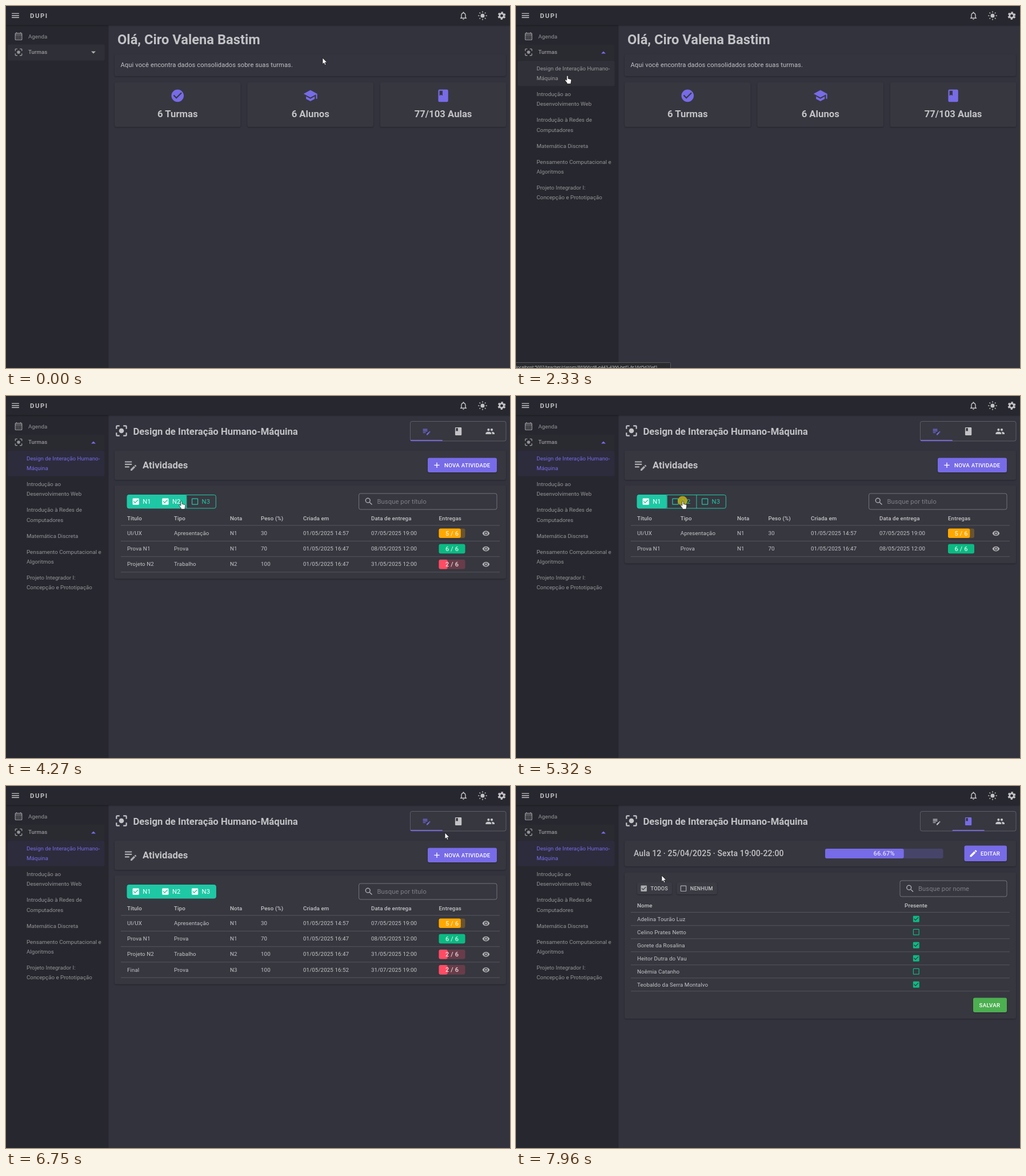
Recreate the animation shown at these times as an HTML page. Size 882x635 px, loop 8 s.

```html
<!DOCTYPE html>
<html lang="pt">
<head>
<meta charset="utf-8">
<title>Turmas</title>
<style>
  html, body { margin: 0; width: 100%; height: 100%; overflow: hidden; background: #32333d; }
  svg { display: block; width: 882px; height: 635px; font-family: Roboto, sans-serif; }
  .shadow { filter: drop-shadow(0 1px 1px rgba(0, 0, 0, .32)); }
  .status { font-family: "Open Sans", sans-serif; }
</style>
</head>
<body>
<svg id="stage" viewBox="0 0 882 635"></svg>
<script>
const LOOP = 8000;
const TEXT = 'rgba(255,255,255,.7)', NAV = 'rgba(255,255,255,.5)', LINE = 'rgba(255,255,255,.15)';
const SURFACE = '#373740', DARK = '#27272f', PURPLE = '#776be7', TEAL = '#1ec8a5', GREEN = '#0bba83';
const ORANGE = '#ffa800', RED = '#ff4c64', ICON = '#adadb1';
const SMALL = 9.75, BODY = 11.15, H6 = 14, H5 = 16.7, H4 = 23.7;

const ICONS = {
  menu: 'M3 18h18v-2H3zm0-5h18v-2H3zm0-7v2h18V6z',
  bell: 'M12 22c1.1 0 2-.9 2-2h-4c0 1.1.9 2 2 2zm6-6v-5c0-3.07-1.63-5.64-4.5-6.32V4a1.5 1.5 0 0 0-3 0v.68C7.64 5.36 6 7.92 6 11v5l-2 2v1h16v-1zm-2 1H8v-6c0-2.48 1.51-4.5 4-4.5s4 2.02 4 4.5z',
  calendar: 'M19 4h-1V2h-2v2H8V2H6v2H5a2 2 0 0 0-2 2v14a2 2 0 0 0 2 2h14a2 2 0 0 0 2-2V6a2 2 0 0 0-2-2zm0 16H5V10h14zm0-12H5V6h14zM9 14H7v-2h2zm4 0h-2v-2h2zm4 0h-2v-2h2zm-8 4H7v-2h2zm4 0h-2v-2h2zm4 0h-2v-2h2z',
  focus: 'M12 8a4 4 0 0 0 0 8 4 4 0 0 0 0-8zm-7 7H3v4a2 2 0 0 0 2 2h4v-2H5zM5 5h4V3H5a2 2 0 0 0-2 2v4h2zm14-2h-4v2h4v4h2V5a2 2 0 0 0-2-2zm0 16h-4v2h4a2 2 0 0 0 2-2v-4h-2z',
  done: 'M12 2a10 10 0 0 0 0 20 10 10 0 0 0 0-20zm-2 15l-5-5 1.41-1.41L10 14.17l7.59-7.59L19 8z',
  school: 'M5 13.18v4L12 21l7-3.82v-4L12 17zM12 3L1 9l11 6 9-4.91V17h2V9z',
  book: 'M18 2H6a2 2 0 0 0-2 2v16a2 2 0 0 0 2 2h12a2 2 0 0 0 2-2V4a2 2 0 0 0-2-2zM6 4h5v8l-2.5-1.5L6 12z',
  note: 'M3 10h11v2H3zm0-2h11V6H3zm0 8h7v-2H3zm15.01-3.13l.71-.71a1 1 0 0 1 1.41 0l.71.71a1 1 0 0 1 0 1.41l-.71.71zm-.71.71l-5.3 5.3V21h2.12l5.3-5.3z',
  group: 'M16 11a3 3 0 1 0-3-3 3 3 0 0 0 3 3zm-8 0a3 3 0 1 0-3-3 3 3 0 0 0 3 3zm0 2c-2.33 0-7 1.17-7 3.5V19h14v-2.5c0-2.33-4.67-3.5-7-3.5zm8 0c-.29 0-.62.02-.97.05 1.16.84 1.97 1.97 1.97 3.45V19h6v-2.5c0-2.33-4.67-3.5-7-3.5z',
  add: 'M19 13h-6v6h-2v-6H5v-2h6V5h2v6h6z',
  search: 'M15.5 14h-.79l-.28-.27A6.5 6.5 0 1 0 13.73 14.43l.27.28v.79l5 4.99L20.49 19zm-6 0a4.5 4.5 0 1 1 0-9 4.5 4.5 0 0 1 0 9z',
  eye: 'M12 4.5C7 4.5 2.73 7.61 1 12c1.73 4.39 6 7.5 11 7.5s9.27-3.11 11-7.5c-1.73-4.39-6-7.5-11-7.5zM12 17a5 5 0 1 1 0-10 5 5 0 0 1 0 10zm0-8a3 3 0 1 0 0 6 3 3 0 0 0 0-6z',
  checked: 'M19 3H5a2 2 0 0 0-2 2v14a2 2 0 0 0 2 2h14a2 2 0 0 0 2-2V5a2 2 0 0 0-2-2zm-9 14l-5-5 1.41-1.41L10 14.17l7.59-7.59L19 8z',
  blank: 'M19 5v14H5V5h14m0-2H5a2 2 0 0 0-2 2v14a2 2 0 0 0 2 2h14a2 2 0 0 0 2-2V5a2 2 0 0 0-2-2z',
  pencil: 'M3 17.25V21h3.75L17.81 9.94l-3.75-3.75zM20.71 7.04a1 1 0 0 0 0-1.41l-2.34-2.34a1 1 0 0 0-1.41 0l-1.83 1.83 3.75 3.75z',
  drop: 'M7 10l5 5 5-5z'
};

// Drawing helpers: each returns SVG markup.
const rect = (x, y, w, h, fill, attrs = 'rx="3"') =>
  `<rect x="${x}" y="${y}" width="${w}" height="${h}" fill="${fill}" ${attrs}/>`;
const paper = (x, y, w, h, fill = SURFACE) => rect(x, y, w, h, fill, 'rx="3" class="shadow"');
const outline = (x, y, w, h, color) => rect(x, y, w, h, 'none', `rx="3" stroke="${color}"`);
const hline = (y, x = 201, w = 663) => rect(x, y - .5, w, 1, LINE, '');
const text = (x, y, str, size = SMALL, { fill = TEXT, weight = 400, anchor = 'start', gap = .0107 } = {}) =>
  `<text x="${x}" y="${y}" font-size="${size}" fill="${fill}" font-weight="${weight}" text-anchor="${anchor}" letter-spacing="${(gap * size).toFixed(2)}">${str}</text>`;
const title = (x, y, str, size = H5, anchor = 'start') => text(x, y, str, size, { weight: 700, anchor, gap: 0 });
const icon = (name, cx, cy, size = 17, fill = ICON, attrs = '') =>
  `<path d="${ICONS[name]}" fill="${fill}" ${attrs} transform="translate(${cx - size / 2} ${cy - size / 2}) scale(${size / 24})"/>`;
const label = (x, y, str, size = SMALL, fill = '#fff') => text(x, y, str, size, { fill, weight: 500, gap: .0286 });
const group = (id, body, attrs = '') => `<g id="${id}" ${attrs}>${body}</g>`;
const searchBox = (x, y, hint) => outline(x, y, 859 - x, 28, 'rgba(255,255,255,.3)') +
  icon('search', x + 17.5, y + 14) + text(x + 32, y + 18, hint, BODY, { fill: 'rgba(255,255,255,.36)' });

function appBar() {
  const sun = '<g transform="translate(834 17) scale(.7)" stroke="#c3c3c6" stroke-width="2"><circle r="5" fill="#c3c3c6" stroke="none"/>' +
    [0, 45, 90, 135].map(a => `<path d="M0-11v3M0 8v3" transform="rotate(${a})"/>`).join('') + '</g>';
  const gear = '<g transform="translate(867.5 17) scale(.7) rotate(14.25)" fill="none" stroke="#c3c3c6">' +
    '<circle r="5.4" stroke-width="4"/><circle r="8" stroke-width="3.8" stroke-dasharray="4.4 3.978"/></g>';
  return rect(0, 0, 882, 33.5, DARK, 'class="shadow"') + icon('menu', 16.5, 16.7, 17, '#c3c3c6') +
    text(42, 21, 'DUPI', 11.3, { weight: 700, gap: .14 }) + icon('bell', 800.5, 17, 17, '#c3c3c6') + sun + gear;
}

function sidebar() {
  const nav = (x, y, str, weight = 400) => text(x, y, str, SMALL, { fill: NAV, weight, gap: 0 });
  const items = [
    [158, 'Introdução ao', 'Desenvolvimento Web'], [203.3, 'Introdução à Redes de', 'Computadores'],
    [248.5, 'Matemática Discreta'], [276.5, 'Pensamento Computacional e', 'Algoritmos'],
    [321.8, 'Projeto Integrador I:', 'Concepção e Prototipação']
  ];
  const current = ['Design de Interação Humano-', 'Máquina']
    .map((s, i) => text(36, 113 + i * 17, s, SMALL, { fill: 'inherit', gap: 0 }).replace('fill="inherit"', '')).join('');
  const list = items.map(([y, ...rows]) => rows.map((s, i) => nav(36, y + i * 17.2, s)).join('')).join('');
  return rect(0, 33, 179, 602, DARK, 'class="shadow"') +
    icon('calendar', 22, 53, 17, '#939397') + nav(39, 56.5, 'Agenda') +
    rect(3, 67.5, 169.5, 28, '#fff', 'rx="3" id="groupRow"') +
    icon('focus', 22, 81, 17, '#939397') + nav(39, 84.3, 'Turmas', 500) +
    `<path id="caret" d="M-4-2h8l-4 4z"/>` +
    group('submenu', rect(3, 96, 169.5, 44.5, '#fff', 'rx="3" id="currentRow"') + group('current', current) + list, 'clip-path="url(#fold)"');
}

function home() {
  const cards = [['done', '6 Turmas'], ['school', '6 Alunos'], ['book', '77/103 Aulas']];
  return title(195, 67, 'Olá, Ciro Valena Bastim', H4) + paper(190, 85, 685, 38, '#33343e') +
    text(200.5, 107.3, 'Aqui você encontra dados consolidados sobre suas turmas.', BODY, { gap: .0094 }) +
    cards.map(([name, str], i) => {
      const x = 190 + i * 232.4;
      return paper(x, 134, 220.6, 78) + icon(name, x + 110.3, 157.3, 26, PURPLE) + title(x + 110.3, 195, str, H5, 'middle');
    }).join('');
}

function courseHeader() {
  return icon('focus', 202, 61, 26, '#c3c3c6') + title(222.5, 67.5, 'Design de Interação Humano-Máquina') +
    rect(707.5, 44.5, 167.5, 34.5, SURFACE) + rect(764, 45, 55.5, 33, '#fff', 'id="tabHover" opacity=".04"') +
    outline(707.5, 44.5, 167.5, 34.5, 'rgba(255,255,255,.2)') +
    ['note', 'book', 'group'].map((name, i) => icon(name, 736 + i * 55.6, 62, 17, '#c3c3c6', `id="tab${i}"`)).join('') +
    rect(708, 77, 55.8, 1.7, PURPLE, 'id="slider"');
}

function activities(count) {
  const columns = count > 2 ? [212, 294, 392, 446, 520, 639, 757.5] : [212, 287.7, 387, 441.5, 516, 636, 756];
  const head = ['Título', 'Tipo', 'Nota', 'Peso (%)', 'Criada em', 'Data de entrega', 'Entregas'];
  const rows = [
    ['UI/UX', 'Apresentação', 'N1', 30, '01/05/2025 14:57', '07/05/2025 19:00', 5, ORANGE],
    ['Prova N1', 'Prova', 'N1', 70, '01/05/2025 16:47', '08/05/2025 12:00', 6, GREEN],
    ['Projeto N2', 'Trabalho', 'N2', 100, '01/05/2025 16:47', '31/05/2025 12:00', 2, RED],
    ['Final', 'Prova', 'N3', 100, '01/05/2025 16:52', '31/07/2025 19:00', 2, RED]
  ].slice(0, count);
  const on = count - 1;
  const chips = [0, 1, 2].map(i => {
    const x = 212 + i * 51.7, color = i < on ? '#fff' : TEAL;
    return (i ? rect(x, 173.5, 1, 23.5, TEAL, '') : '') + icon(i < on ? 'checked' : 'blank', x + 15.2, 185, 15, color) +
      text(x + 27.2, 189.2, 'N' + (i + 1), BODY, { fill: color });
  }).join('');
  const body = rows.map((row, i) => {
    const y = 240.7 + i * 27.2, x = columns[6], [done, color] = row.slice(6);
    return row.slice(0, 6).map((s, c) => text(columns[c], y + 3.3, s)).join('') +
      rect(x, y - 8.2, 46, 16.6, color, 'rx="3" opacity=".25"') + rect(x, y - 8.2, 46 * done / 6, 16.6, color) +
      text(x + 23, y + 4.1, done + ' / 6', BODY, { fill: 'rgba(255,255,255,.8)', weight: 500, anchor: 'middle' }) +
      icon('eye', 840, y + .2, 14) + hline(y + 13.8);
  }).join('');
  return paper(190, 95.5, 685, 51.5) + icon('note', 218, 121, 26.5) + title(239, 126.8, 'Atividades') +
    paper(738, 108.5, 121, 25.5, PURPLE) + icon('add', 754, 121.3, 16, '#fff') + label(767, 124.8, 'NOVA ATIVIDADE') +
    paper(190, 157, 685, 82 + count * 27.2) +
    rect(212, 173.5, on * 51.8, 23.5, TEAL) + outline(212, 173.5, 155.3, 23.5, TEAL) + chips + searchBox(617.5, 171, 'Busque por título') +
    head.map((s, c) => text(columns[c], 218, s, SMALL, { weight: 500 })).join('') + hline(227) + body;
}

function lesson() {
  const students = ['Adelina Tourão Luz', 'Celino Prates Netto', 'Gorete da Rosalina', 'Heitor Dutra do Vau', 'Noêmia Catanho', 'Teobaldo da Serra Montalvo'];
  const absent = [1, 4];
  const small = (x, w, name, str) => paper(x, 169, w, 21, '#3b3b44') + icon(name, x + 11.7, 179.8, 14) + label(x + 23.5, 183, str, 9.05, TEXT);
  return paper(190, 95.5, 685, 45.5) + text(206, 123.3, 'Aula 12 · 25/04/2025 · Sexta 19:00-22:00', H6, { weight: 500, gap: .0075 }) +
    rect(541, 110, 206.5, 17, PURPLE, 'rx="3" opacity=".25"') + rect(541, 110, 137.7, 17, PURPLE) +
    text(644.2, 122.4, '66.67%', BODY, { fill: 'rgba(255,255,255,.75)', weight: 500, anchor: 'middle' }) +
    paper(784.5, 104.5, 74.5, 27.5, PURPLE) + icon('pencil', 800.5, 118.3, 16, '#fff') + label(813, 121.8, 'EDITAR') +
    paper(190, 151.5, 685, 256.5) + small(212, 61, 'checked', 'TODOS') + small(281.3, 70.5, 'blank', 'NENHUM') +
    searchBox(672, 166, 'Busque por nome') +
    text(212, 212.5, 'Nome', SMALL, { weight: 500 }) + text(700, 212.5, 'Presente', SMALL, { weight: 500, anchor: 'middle' }) + hline(221.5) +
    students.map((s, i) => text(212, 236.6 + i * 23, s) +
      icon(absent.includes(i) ? 'blank' : 'checked', 700.3, 233.2 + i * 23, 14.6, GREEN) + hline(244.8 + i * 23)).join('') +
    paper(800, 371.5, 59, 25.5, '#4caf50') + label(810.5, 387.6, 'SALVAR');
}

const statusBar = rect(-1, 625.5, 271.5, 12, '#292a2d', 'stroke="#5a5b60" rx="1"') +
  `<g class="status">${text(0, 635.5, 'localhost:5002/teacher/classes/86966cd8-e443-4366-bef1-fe16d5d20af1', 7.4, { fill: '#d8d8da', gap: 0 })}</g>`;

const pages = { home: home(), activities4: activities(4), activities3: activities(3), activities2: activities(2), lesson: lesson() };
document.getElementById('stage').innerHTML =
  '<defs><clipPath id="fold"><rect id="foldBox" y="96" width="179"/></clipPath><clipPath id="rippleClip"><rect id="rippleBox" rx="3"/></clipPath></defs>' +
  rect(0, 0, 882, 635, '#32333d', '') + group('courseHeader', courseHeader()) +
  Object.entries(pages).map(([id, body]) => group(id, body)).join('') + sidebar() + appBar() +
  '<g clip-path="url(#rippleClip)"><circle id="ripple" fill="#fff"/></g>' + group('status', statusBar) +
  '<circle id="press" r="8.5" fill="#bdb118" opacity=".85"/>' +
  group('pointer', '<path id="arrow" d="M0 0V11L2.5 8.7 4.2 12.5 6 11.7 4.3 8H7.8Z"/>' +
    '<path id="hand" d="M-1.2 1Q0-.8 1.2 1V5.4L5.6 6.6Q7 7 6.8 9L6 12.6V14.6H-.8V12.8L-4 8.8Q-4.6 6.8-2.8 7L-1.2 8.4Z"/>',
    'fill="#fff" stroke="#111" stroke-width=".7"');

const el = Object.fromEntries([...document.querySelectorAll('[id]')].map(node => [node.id, node]));
const set = (id, attrs) => { for (const k in attrs) el[id].setAttribute(k, attrs[k]); };
const show = (id, visible) => { el[id].style.display = visible ? '' : 'none'; };

// Timeline
const PATH = [
  [0, 554, 91], [30, 554, 91], [40, 550, 93], [250, 550, 93], [700, 250, 59], [1030, 81, 77], [1960, 81, 77], [2300, 90, 122],
  [2790, 90, 122], [3410, 311, 172], [3570, 343, 184], [4060, 343, 184], [4390, 292, 184], [5620, 292, 184],
  [5900, 343, 184], [6220, 343, 184], [6750, 768, 82], [7000, 791, 62], [7680, 791, 62], [7960, 255, 157], [LOOP, 255, 157]
];
const VIEWS = [[0, 'home'], [2510, 'activities4'], [3740, 'activities3'], [4610, 'activities2'], [5400, 'activities3'], [6040, 'activities4'], [7140, 'lesson']];
const GROUP_ROW = [3, 67.5, 169.5, 28], CURRENT_ROW = [3, 96, 169.5, 44.5];
const CHIP2 = [264, 174, 51, 23], CHIP3 = [316, 174, 51, 23], BOOK_TAB = [764, 45, 55.5, 33];
const CLICKS = [
  [1215, GROUP_ROW, 86], [2500, CURRENT_ROW, 88], [3740, CHIP3, 28], [4610, CHIP2, 28],
  [5400, CHIP2, 28], [6040, CHIP3, 28], [7140, BOOK_TAB, 33]
];

const clamp = v => Math.min(1, Math.max(0, v));
const lastBefore = (list, t) => list.filter(item => item[0] <= t).pop();
const inside = ([x, y], [bx, by, w, h]) => x >= bx && x <= bx + w && y >= by && y <= by + h;

function bezier(x1, y1, x2, y2, p) {
  const at = (a, b, s) => 3 * a * s * (1 - s) ** 2 + 3 * b * s * s * (1 - s) + s ** 3;
  let low = 0, high = 1;
  for (let i = 0; i < 20; i++) {
    const mid = (low + high) / 2;
    if (at(x1, x2, mid) < p) low = mid; else high = mid;
  }
  return at(y1, y2, low);
}
const standard = p => bezier(.4, 0, .2, 1, clamp(p));
const ease = p => bezier(.25, .1, .25, 1, clamp(p));

// Hermite spline with the gentler neighbouring slope at each point, so it never overshoots.
function pointerAt(t) {
  const i = Math.max(0, PATH.findIndex(p => p[0] > t) - 1);
  const slope = (k, c) => PATH[k] && PATH[k + 1] ? (PATH[k + 1][c] - PATH[k][c]) / (PATH[k + 1][0] - PATH[k][0]) : 0;
  const tangent = (k, c) => {
    const a = slope(k - 1, c), b = slope(k, c);
    return a * b <= 0 ? 0 : Math.abs(a) < Math.abs(b) ? a : b;
  };
  const span = PATH[i + 1][0] - PATH[i][0], s = (t - PATH[i][0]) / span;
  return [1, 2].map(c => {
    const from = PATH[i][c], to = PATH[i + 1][c];
    return from + (to - from) * s * s * (3 - 2 * s) +
      span * s * (1 - s) * ((1 - s) * tangent(i, c) - s * tangent(i + 1, c));
  });
}

function draw(t) {
  const view = lastBefore(VIEWS, t)[1], atHome = view === 'home', inLesson = view === 'lesson';
  for (const id in pages) show(id, id === view);
  show('courseHeader', !atHome);

  const [x, y] = pointerAt(t), point = [x, y];
  const unfold = standard((t - 1250) / 300);
  set('foldBox', { height: 250 * unfold });
  set('caret', { transform: `translate(153 81.5) rotate(${180 * unfold})`, fill: t < 1250 ? ICON : PURPLE });
  set('groupRow', { opacity: t < 2000 ? .04 : .012 });
  set('current', { fill: atHome ? NAV : PURPLE });
  set('currentRow', atHome
    ? { fill: '#fff', opacity: inside(point, CURRENT_ROW) && unfold === 1 || t > 2000 && inside(point, CURRENT_ROW) ? .045 : 0 }
    : { fill: PURPLE, opacity: .08 });
  show('status', t > 2120 && t < 2600);

  set('slider', { x: 708 + 55.8 * ease((t - 7150) / 300) });
  set('tab0', { fill: inLesson ? '#c3c3c6' : PURPLE });
  set('tab1', { fill: inLesson ? PURPLE : '#c3c3c6' });
  show('tabHover', inside(point, BOOK_TAB));

  const click = lastBefore(CLICKS, t);
  show('ripple', click);
  if (click) {
    const [start, [bx, by, width, height], radius] = click, [cx, cy] = pointerAt(start);
    set('rippleBox', { x: bx, y: by, width, height });
    set('ripple', { cx, cy: cy + 4, r: radius * ease((t - start) / 300), opacity: .09 * (1 - ease((t - start) / 800)) });
  }
  show('press', CLICKS.some(([release]) => t >= release - 85 && t < release));
  set('press', { cx: x - .5, cy: y });

  const links = [[0, 39, 173, 28 + 28.5 + 250 * unfold], [212, 173.5, 155.5, 23.5], [708, 45, 167, 33.5]];
  const linked = links.some((box, i) => (i === 0 || (!atHome && (i === 2 || !inLesson))) && inside(point, box));
  set('pointer', { transform: `translate(${x} ${y})` });
  show('hand', linked);
  show('arrow', !linked);
}

function tick() {
  draw(performance.now() % LOOP);
  requestAnimationFrame(tick);
}
tick();
</script>
</body>
</html>
```
